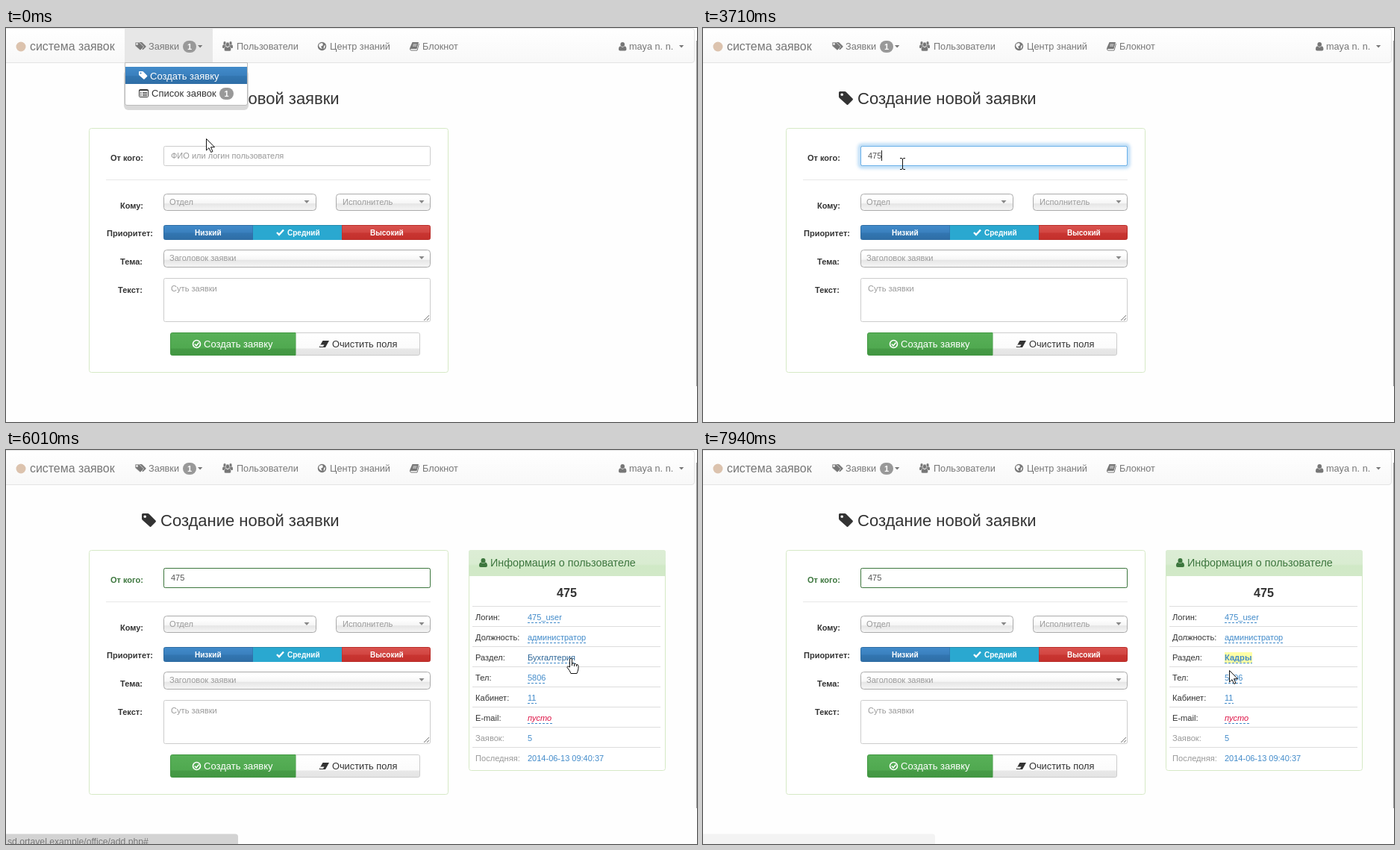
An HTML page that plays this animation: 926x528 px, repeating every 8 s.

```html
<!DOCTYPE html>
<html lang="ru">
<head>
<meta charset="utf-8">
<title>Система заявок</title>
<style>
html, body { margin: 0; width: 100%; height: 100%; overflow: hidden; background: #fefefe; }
svg { display: block; font: 11.1px "Liberation Sans", Arial, sans-serif; fill: #333; }
text { white-space: pre; }
.nav { fill: #777; font-size: 12.7px; }
.mid { font-size: 13px; }
.hint { fill: #999; }
.bold { font-weight: bold; }
.white { fill: #fff; }
.link { fill: #428bca; }
.dash { stroke: #428bca; stroke-dasharray: 3 2; }
.frame { fill: #fff; stroke: #ccc; }
.chosen { fill: url(#chosen); stroke: #aaa; }
.glow { fill: none; stroke-width: 4; filter: blur(2px); }

/* One loop is 8 s, so 1% is 80 ms. */
.step, .fade { animation: 8s step-end infinite both; }
.fade { animation-timing-function: linear; }

.menu { animation-name: menu; }
@keyframes menu { 0% { opacity: 1 } 2.5%, 100% { opacity: 0 } }

#blue { animation-name: blue; }
@keyframes blue { 0%, 7.5% { opacity: 0 } 9.4%, 46.4% { opacity: 1 } 47.9%, 100% { opacity: 0 } }
#valid { animation-name: valid; }
@keyframes valid { 0%, 46.4% { opacity: 0 } 47.9%, 100% { opacity: 1 } }
#greenFocus { animation-name: greenFocus; }
@keyframes greenFocus { 0%, 46.4% { opacity: 0 } 47.9%, 74.3% { opacity: 1 } 74.4%, 100% { opacity: 0 } }
#fromLabel { animation-name: fromLabel; }
@keyframes fromLabel { 0%, 46.4% { fill: #333 } 47.9%, 100% { fill: #3c763d } }

#holder { animation-name: holder; }
@keyframes holder { 0% { opacity: 1 } 16.75%, 100% { opacity: 0 } }
#key1 { animation-name: key1; }
@keyframes key1 { 0% { opacity: 0 } 16.75%, 100% { opacity: 1 } }
#key2 { animation-name: key2; }
@keyframes key2 { 0% { opacity: 0 } 22.875%, 100% { opacity: 1 } }
#key3 { animation-name: key3; }
@keyframes key3 { 0% { opacity: 0 } 39.875%, 100% { opacity: 1 } }
#caret { animation-name: caret; }
@keyframes caret {
  0% { opacity: 0; transform: translateX(227px) }
  18.25% { opacity: 1; transform: translateX(227px) }
  22.875% { opacity: 1; transform: translateX(233px) }
  33.25% { opacity: 0; transform: translateX(233px) }
  39.875% { opacity: 1; transform: translateX(239px) }
  74.375%, 100% { opacity: 0; transform: translateX(239px) }
}
#suggest { animation-name: suggest; }
@keyframes suggest { 0% { opacity: 0 } 27.625% { opacity: 1 } 46.375%, 100% { opacity: 0 } }

#info { animation-name: info; }
@keyframes info { 0% { opacity: 0 } 53.25% { opacity: 0; animation-timing-function: ease-in-out } 58.25%, 100% { opacity: 1 } }
#oldLink { animation-name: oldLink; }
@keyframes oldLink { 0% { opacity: 1; fill: #428bca } 71.375% { opacity: 1; fill: #2a6496 } 78% { opacity: 1; fill: #428bca } 95.5%, 100% { opacity: 0 } }
#newLink { animation-name: newLink; }
@keyframes newLink { 0% { opacity: 0 } 95.5%, 100% { opacity: 1 } }

#status { animation-name: status; }
@keyframes status { 0%, 74.3% { opacity: 0 } 75%, 80% { opacity: 1 } 84.5% { opacity: .5 } 90%, 100% { opacity: .26 } }
#address { animation-name: address; }
@keyframes address { 0%, 84.5% { opacity: 1 } 90%, 100% { opacity: 0 } }

#popover { animation-name: popover; }
@keyframes popover { 0%, 77% { opacity: 0 } 79%, 94.1% { opacity: 1 } 96%, 100% { opacity: 0 } }
#list { animation-name: list; }
@keyframes list { 0% { opacity: 0 } 84.5% { opacity: 1 } 92%, 100% { opacity: 0 } }
#pick1 { animation-name: pick1; }
@keyframes pick1 { 0% { opacity: 0 } 86.5% { opacity: 1 } 89%, 100% { opacity: 0 } }
#pick2 { animation-name: pick2; }
@keyframes pick2 { 0% { opacity: 0 } 89%, 100% { opacity: 1 } }
#chosenValue { animation-name: chosenValue; }
@keyframes chosenValue { 0% { opacity: 0 } 92%, 100% { opacity: 1 } }

#pointer { animation-name: pointer; }
@keyframes pointer {
  0%, .75% { transform: translate(268px, 148px) }
  3.5% { transform: translate(267px, 168px) }
  10% { transform: translate(267px, 182px) }
  61.1% { transform: translate(267px, 182px); animation-timing-function: ease-in-out }
  69.1%, 71.3% { transform: translate(765px, 282px) }
  72.1% { transform: translate(757px, 279px) }
  78% { transform: translate(757px, 279px); animation-timing-function: ease-in-out }
  83.9%, 84.5% { transform: translate(706px, 238px) }
  91.5%, 94.1% { transform: translate(664px, 268px); animation-timing-function: ease-in-out }
  99.25%, 100% { transform: translate(705px, 295px) }
}
#arrow { animation-name: arrow; }
@keyframes arrow { 0% { opacity: 1 } 2.5% { opacity: 0 } 62% { opacity: 1 } 71.375% { opacity: 0 } 78%, 100% { opacity: 1 } }
#beam { animation-name: beam; }
@keyframes beam { 0% { opacity: 0 } 2.5% { opacity: 1 } 62%, 100% { opacity: 0 } }
#hand { animation-name: hand; }
@keyframes hand { 0% { opacity: 0 } 71.375% { opacity: 1 } 78%, 100% { opacity: 0 } }
</style>
</head>
<body>
<svg width="926" height="528" viewBox="0 0 926 528">
<defs>
  <linearGradient id="bar" x2="0" y2="1"><stop stop-color="#fff"/><stop offset="1" stop-color="#f8f8f8"/></linearGradient>
  <linearGradient id="chosen" x2="0" y2="1"><stop offset=".2" stop-color="#fff"/><stop offset=".55" stop-color="#f6f6f6"/><stop offset=".6" stop-color="#e6e6e6"/><stop offset="1" stop-color="#f6f6f6"/></linearGradient>
  <linearGradient id="low" x2="0" y2="1"><stop stop-color="#428bca"/><stop offset=".5" stop-color="#3a80be"/><stop offset=".55" stop-color="#3276b1"/><stop offset="1" stop-color="#2f6ea6"/></linearGradient>
  <linearGradient id="high" x2="0" y2="1"><stop stop-color="#d9534f"/><stop offset=".5" stop-color="#d24541"/><stop offset=".55" stop-color="#c83531"/><stop offset="1" stop-color="#c4302c"/></linearGradient>
  <linearGradient id="green" x2="0" y2="1"><stop stop-color="#58b058"/><stop offset=".68" stop-color="#50a950"/><stop offset=".72" stop-color="#459a45"/><stop offset="1" stop-color="#429742"/></linearGradient>
  <linearGradient id="plain" x2="0" y2="1"><stop stop-color="#fff"/><stop offset=".68" stop-color="#fbfbfb"/><stop offset=".72" stop-color="#e8e8e8"/><stop offset="1" stop-color="#e4e4e4"/></linearGradient>
  <linearGradient id="head" x2="0" y2="1"><stop stop-color="#dcedd5"/><stop offset=".54" stop-color="#d9ecd1"/><stop offset=".6" stop-color="#d0e9c6"/><stop offset="1" stop-color="#d2e9c8"/></linearGradient>
  <path id="tag" fill-rule="evenodd" d="M1.5 0H8Q9 0 10 1L18.5 9.5Q19.5 10.5 18.5 11.5L12.5 17.5Q11.5 18.5 10.5 17.5L1 9Q0 8 0 7V1.5Q0 0 1.5 0ZM4.2 2.4A1.8 1.8 0 1 0 4.2 6A1.8 1.8 0 1 0 4.2 2.4Z"/>
  <path id="user" d="M5.5 0A3 3.2 0 0 1 5.5 6.4A3 3.2 0 0 1 5.5 0ZM2.5 5.5Q5.5 8.5 8.5 5.5Q11 6 11 10Q11 12 9 12H2Q0 12 0 10Q0 6 2.5 5.5Z"/>
  <path id="down" d="M0 0H7L3.5 4Z"/>
  <path id="check" d="M1 5L4 8L10 1.5" fill="none" stroke-width="2.4"/>
</defs>

<rect width="926" height="528" fill="#fefefe"/>
<path d="M925.5 17V480" stroke="#999"/>

<!-- Navigation bar -->
<path d="M0 .5H919Q922.5 .5 922.5 4V43Q922.5 46.5 919 46.5H0" fill="url(#bar)" stroke="#e4e4e4"/>
<rect class="step menu" x="159" y="1" width="118" height="45" fill="#e7e7e7"/>
<circle cx="20" cy="25" r="6.5" fill="#dcc3ae"/>
<g class="nav">
  <text x="32" y="30" font-size="15.9">система заявок</text>
  <use href="#tag" transform="translate(177 19) scale(.56)"/>
  <use href="#tag" transform="translate(173 19) scale(.6)" stroke="#f8f8f8" stroke-width="1.2"/>
  <text x="191" y="29">Заявки</text>
  <rect x="237" y="17" width="18" height="16" rx="8" fill="#999"/>
  <text class="bold white" x="243" y="29" font-size="11">1</text>
  <use href="#down" transform="translate(257 23) scale(.9)"/>
  <use href="#user" transform="translate(290 18) scale(.55 .75)"/>
  <use href="#user" transform="translate(298 18) scale(.55 .75)"/>
  <use href="#user" transform="translate(292.3 19) scale(.85 1)" stroke="#fafafa" stroke-width=".6"/>
  <text x="309" y="29">Пользователи</text>
  <circle cx="423.5" cy="24.5" r="5.7"/>
  <path d="M420 21L424 20L425 23L422 25L424 28L421 27L419 24ZM426 24L428 23L427 27L425.500 28Z" fill="#fafafa"/>
  <text x="434" y="29">Центр знаний</text>
  <path d="M544.500 19H553L550.500 28H542.500Q540.500 28 541.500 26Z"/>
  <path d="M545.500 22H550.500M545 24H550M542.500 29.500H551L553 21" stroke="#fafafa" fill="none" stroke-width=".8"/>
  <path d="M541.500 27Q541 30 543 30H551L553.500 21" stroke="#777" fill="none"/>
  <text x="558" y="29">Блокнот</text>
  <use href="#user" transform="translate(821 19) scale(.95)"/>
  <text x="835" y="29">maya n. n.</text>
  <use href="#down" transform="translate(902 23) scale(.9)"/>
</g>

<use href="#tag" x="182" y="85"/>
<text x="207" y="102" font-size="22">Создание новой заявки</text>

<!-- Request form -->
<rect x="111.500" y="134.500" width="481" height="327" rx="3" fill="#fff" stroke="#d6e9c6"/>
<path d="M134 203.500H569" stroke="#e8e8e8"/>
<g class="bold" font-size="11">
  <text id="fromLabel" class="fade" x="140" y="178">От кого:</text>
  <text x="153" y="242">Кому:</text>
  <text x="135" y="279">Приоритет:</text>
  <text x="153" y="317">Тема:</text>
  <text x="150" y="355">Текст:</text>
</g>

<g id="blue" class="fade"><rect class="glow" x="210" y="157" width="360" height="29" rx="3" stroke="#a8d2f3"/></g>
<g id="greenFocus" class="fade"><rect class="glow" x="210" y="157" width="360" height="29" rx="3" stroke="#8fc58f"/></g>
<rect class="frame" x="211.500" y="158.500" width="357" height="26" rx="2"/>
<rect class="fade" style="animation-name:blue" x="211.500" y="158.500" width="357" height="26" rx="2" fill="none" stroke="#66afe9"/>
<rect id="valid" class="fade" x="211.500" y="158.500" width="357" height="26" rx="2" fill="none" stroke="#3c763d"/>
<rect class="fade" style="animation-name:greenFocus" x="211.500" y="158.500" width="357" height="26" rx="2" fill="none" stroke="#2b542c"/>
<text id="holder" class="step hint" x="221" y="175" font-size="11">ФИО или логин пользователя</text>
<g fill="#555" font-size="11">
  <text id="key1" class="step" x="221" y="175">4</text>
  <text id="key2" class="step" x="227.100" y="175">7</text>
  <text id="key3" class="step" x="233.200" y="175">5</text>
</g>
<path id="caret" class="step" d="M.5 164V178" stroke="#222"/>

<rect class="chosen" x="211.500" y="222.500" width="204" height="22" rx="4"/>
<rect class="chosen" x="442.500" y="222.500" width="126" height="22" rx="4"/>
<rect class="chosen" x="211.500" y="297.500" width="357" height="23" rx="4"/>
<rect class="frame" x="211.500" y="335.500" width="357" height="58" rx="2"/>
<path d="M560 392L567 385M564 392L567 389" stroke="#777"/>
<g class="hint">
  <text x="219" y="237">Отдел</text>
  <text x="451" y="237">Исполнитель</text>
  <text x="219" y="312">Заголовок заявки</text>
  <text x="221" y="353">Суть заявки</text>
</g>
<g fill="#888">
  <use href="#down" x="399.500" y="231"/><use href="#down" x="553.500" y="231"/><use href="#down" x="553.500" y="306"/>
</g>

<path d="M331 264.500H213.500Q211.500 264.500 211.500 266.500V281.500Q211.500 283.500 213.500 283.500H331Z" fill="url(#low)" stroke="#2d6ca2"/>
<path d="M450 264.500H566.500Q568.500 264.500 568.500 266.500V281.500Q568.500 283.500 566.500 283.500H450Z" fill="url(#high)" stroke="#b92c28"/>
<rect x="331" y="264" width="119" height="20" fill="#2aa8d0"/>
<path d="M331 264.500H450" stroke="#2389ab"/>
<g class="bold white" font-size="10">
  <text x="253" y="278">Низкий</text>
  <use href="#check" x="362" y="269" stroke="#fff"/>
  <text x="377" y="278">Средний</text>
  <text x="488" y="278">Высокий</text>
</g>

<path d="M388.500 408.500H222.500Q220.500 408.500 220.500 411V436Q220.500 438.500 222.500 438.500H388.500Z" fill="url(#green)" stroke="#419641"/>
<path d="M388.500 408.500H552.500Q554.500 408.500 554.500 411V436Q554.500 438.500 552.500 438.500H388.500" fill="url(#plain)" stroke="#ccc"/>
<circle cx="255.500" cy="423.500" r="5" fill="none" stroke="#fff" stroke-width="1.6"/>
<path d="M252.800 423.500L255 425.700L258.500 421.500" fill="none" stroke="#fff" stroke-width="1.6"/>
<text class="mid white" x="265" y="428">Создать заявку</text>
<path d="M424.500 419H433L428 428H419.500Z"/>
<path d="M421.500 424.500H426.500L425 427H420.300Z" fill="#f4f4f4"/>
<text x="437" y="428" font-size="12.800">Очистить поля</text>

<!-- Suggestions -->
<g id="suggest" class="step">
  <rect x="211" y="189" width="359" height="29" rx="4" opacity=".25" style="filter:blur(3px)"/>
  <path d="M211.500 185.500H569.500V211Q569.500 214.500 566 214.500H215Q211.500 214.500 211.500 211Z" class="frame"/>
  <text x="226" y="204" font-size="12.600">475</text>
</g>

<!-- User details -->
<g id="info" class="fade">
  <rect x="620.500" y="134.500" width="263" height="295" rx="3" fill="#fff" stroke="#d6e9c6"/>
  <path d="M620 169V137Q620 134 623 134H881Q884 134 884 137V169Z" fill="url(#head)"/>
  <g fill="#3c763d">
    <use href="#user" x="634" y="145"/>
    <text x="649" y="156" font-size="14.350">Информация о пользователе</text>
  </g>
  <text class="bold" x="751.500" y="197" font-size="16.200" text-anchor="middle">475</text>
  <g id="rows"></g>
  <g id="oldLink" class="step link">
    <text x="699" y="282">Бухгалтерия</text>
    <path class="dash" d="M699 285.500H764"/>
  </g>
  <g id="newLink" class="step link">
    <rect x="699" y="271" width="37" height="15" fill="#ffffa6"/>
    <text class="bold" x="699" y="282">Кадры</text>
    <path class="dash" d="M699 285.500H736"/>
  </g>
</g>

<!-- Department popover -->
<g id="popover" class="fade">
  <rect x="598" y="188" width="269" height="78" rx="5" opacity=".3" style="filter:blur(3px)"/>
  <path d="M603 184.500H862Q866.500 184.500 866.500 189V257Q866.500 261.500 862 261.500H742L732.500 270.500L723 261.500H603Q598.500 261.500 598.500 257V189Q598.500 184.500 603 184.500Z" fill="#fff" stroke="#bbb"/>
  <path d="M599 217V189Q599 185 603 185H862Q866 185 866 189V217Z" fill="#f7f7f7"/>
  <path d="M599 217.500H866" stroke="#ebebeb"/>
  <text class="mid" x="611" y="205">Вкажіть підрозділ</text>
  <rect class="glow" x="610.500" y="224.500" width="111" height="28" rx="3" stroke="#a8d2f3"/>
  <rect x="611.500" y="225.500" width="109" height="26" rx="2" fill="#fff" stroke="#66afe9"/>
  <use href="#down" transform="translate(707.500 235) scale(1 1.500)" fill="#000"/>
  <text id="chosenValue" class="step" x="621" y="242" fill="#555">Кадры</text>
  <g id="list" class="step" fill="#555">
    <rect x="611.500" y="251.500" width="108" height="29" fill="#fff" stroke="#7da2ce"/>
    <text x="625" y="263">Бухгалтерия</text>
    <text x="625" y="277">Кадры</text>
    <g id="pick1" class="step"><rect x="612" y="252" width="107" height="14" fill="#39f"/><text class="white" x="625" y="263">Бухгалтерия</text></g>
    <g id="pick2" class="step"><rect x="612" y="266" width="107" height="14" fill="#39f"/><text class="white" x="625" y="277">Кадры</text></g>
  </g>
</g>

<!-- Open menu -->
<g class="step menu">
  <rect x="158" y="56" width="167" height="54" rx="6" fill="#d9d9d9"/>
  <path d="M159.500 46.500H323.500V101Q323.500 103.500 321 103.500H162Q159.500 103.500 159.500 101Z" fill="#fff" stroke="#bbb"/>
  <rect x="160" y="52" width="163" height="23" fill="url(#low)"/>
  <use class="white" href="#tag" transform="translate(178 58) scale(.6)"/>
  <text class="mid white" x="193" y="69">Создать заявку</text>
  <rect x="178.500" y="82.500" width="12" height="10" rx="1" fill="none" stroke="#333"/>
  <path d="M178 83.500H191M180 86.500H181.500M183 86.500H189M180 88.500H181.500M183 88.500H189M180 90.500H181.500M183 90.500H189" stroke="#333"/>
  <text class="mid" x="195" y="92">Список заявок</text>
  <rect x="286" y="80" width="19" height="16" rx="8" fill="#999"/>
  <text class="bold white" x="292.500" y="92" font-size="11">1</text>
</g>

<g id="status" class="fade">
  <path d="M0 514.500H307Q311 514.500 311 518V528H0Z" fill="#d3d3d3"/>
  <text id="address" class="fade" x="2" y="528.500" font-size="12.200" fill="#777">sd.ortavel.example/office/add.php#</text>
</g>

<g id="pointer" class="fade">
  <path id="arrow" class="step" d="M.5 .5V16L4 12.700L6.700 18.500L9 17.500L6.500 11.700H11.500Z" fill="#fff" stroke="#111"/>
  <path id="beam" class="step" d="M-3 -7.500H-1L.5 -6.500L2 -7.500H4M.5 -6.500V6.500M-3 7.500H-1L.5 6.500L2 7.500H4" fill="none" stroke="#111"/>
  <path id="hand" class="step" d="M-1.500 1Q0 -1 1.500 1V7Q3.500 6 4.500 7.700Q6.500 6.800 7.500 8.500Q9.800 8 10 10.500V14Q9.500 17 8 20.500H0Q-1 17 -5 12.500Q-5 9.500 -1.500 12Z M1.500 7V10M4.500 8V11M7.500 9V11" fill="#fff" stroke="#111"/>
</g>
</svg>
<script>
// label, value, underline width (0 for plain values), value colour
const rows = [
  ['Логин:', '475_user', 43], ['Должность:', 'администратор', 80], ['Раздел:', '', 0],
  ['Тел:', '5806', 24], ['Кабинет:', '11', 12], ['E-mail:', 'пусто', 33, '#d14'],
  ['Заявок:', '5', 0], ['Последняя:', '2014-06-13 09:40:37', 0]
];
document.getElementById('rows').innerHTML = rows.map(([label, value, width, color = '#428bca'], i) => {
  const y = 228 + 27 * i;
  const slant = color === '#d14' ? 'italic' : 'normal';
  return `<path d="M625 ${y - 18.5}H877" stroke="#ddd"/>
    <text x="629" y="${y}" fill="${i > 5 ? '#999' : '#333'}">${label}</text>
    <text x="699" y="${y}" font-size="11" fill="${color}" font-style="${slant}">${value}</text>
    ${width ? `<path class="dash" d="M699 ${y + 3.5}h${width}"/>` : ''}`;
}).join('');
</script>
</body>
</html>
```
